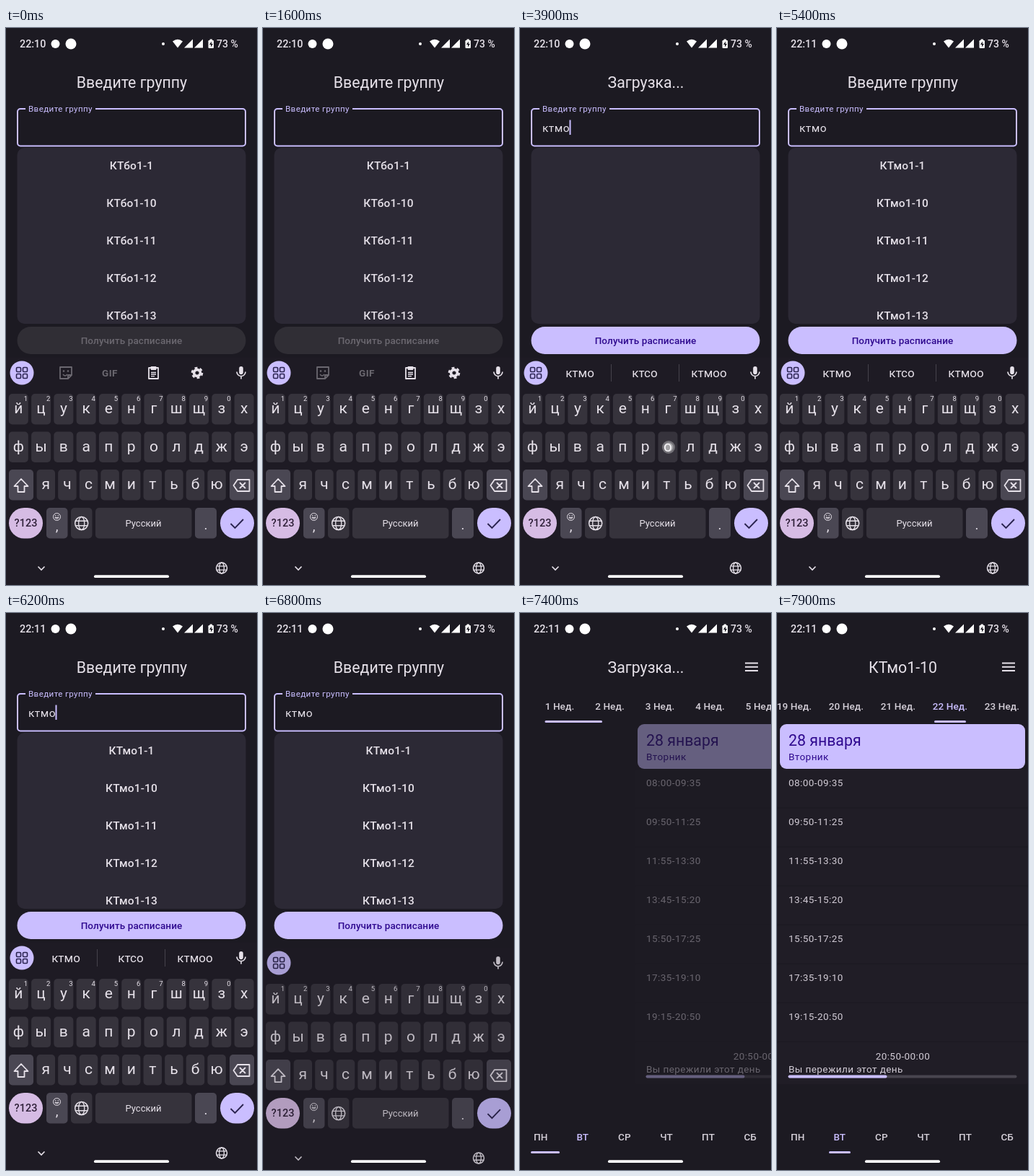
An HTML page that plays this animation: 348 px wide and 772 px high, repeating every 8000 ms.

```html
<!DOCTYPE html>
<html lang="ru">
<head>
<meta charset="utf-8">
<title>Расписание</title>
<style>
  html, body { margin: 0; width: 100%; height: 100%; overflow: hidden; background: #1c1a22; }
  svg { display: block; width: 100vw; height: 100vh; font-family: Roboto, "Noto Sans", sans-serif; }
  text { white-space: pre; }
</style>
</head>
<body>
<svg id="stage" viewBox="0 0 348 772"></svg>
<script>
const LOOP = 8000, STEP = 100;
const BG = '#1c1a22', INK = '#e6e1e9', ACCENT = '#cabeff', DEEP = '#2f0a8f',
      KEY = '#36333c', KEY_ALT = '#4a4753', DIM = '#6b6870';

// ---- drawing helpers ----
const rect = (x, y, w, h, r, fill, more = '') =>
  `<rect x="${x}" y="${y}" width="${w}" height="${h}" rx="${r}" fill="${fill}" ${more}/>`;
const circle = (x, y, r, fill, more = '') => `<circle cx="${x}" cy="${y}" r="${r}" fill="${fill}" ${more}/>`;
const line = (d, color = INK, width = 1.6, more = '') =>
  `<path d="${d}" fill="none" stroke="${color}" stroke-width="${width}" ${more}/>`;
const shape = (d, fill = INK) => `<path d="${d}" fill="${fill}"/>`;
const label = (s, x, y, size, { fill = INK, anchor = 'middle', weight = 400, gap = 0, id = '' } = {}) =>
  `<text ${id && `id="${id}"`} x="${x}" y="${y}" font-size="${size}" fill="${fill}" text-anchor="${anchor}" font-weight="${weight}" letter-spacing="${gap}">${s}</text>`;
const group = (id, body, more = '') => `<g id="${id}" ${more}>${body}</g>`;
const at = (x, y, body) => `<g transform="translate(${x} ${y})">${body}</g>`;
const globe = (x, y, r) => at(x, y,
  circle(0, 0, r, 'none', `stroke="${INK}" stroke-width="1.5"`) +
  `<ellipse rx="${r * .45}" ry="${r}" fill="none" stroke="${INK}" stroke-width="1.3"/>` +
  line(`M${-r * .9} ${-r * .36}H${r * .9}M${-r * .9} ${r * .36}H${r * .9}`, INK, 1.3));

// ---- status bar ----
const statusBar = () =>
  label('22:10', 19, 27, 14.3, { anchor: 'start', weight: 500, id: 'clock' }) +
  circle(68.5, 22, 6, '#fff') + circle(90, 22, 7.5, '#fff') + circle(218, 22, 2, '#fff') +
  shape('M231 18.5Q238 13 245 18.5L238 27.5Z', '#fff') +
  [247, 261].map(x => shape(`M${x} 27.5H${x + 12}V15.5Z`, '#fff')).join('') +
  rect(280.5, 17, 7.5, 11, 1.3, '#fff') + rect(282.5, 15.6, 3.5, 2, .5, '#fff') +
  shape('M285 18.5L282 23H284V26.5L287 22H285Z', BG) +
  label('73 %', 292, 27, 14, { anchor: 'start', weight: 500 });

// ---- search screen ----
const items = prefix => ['1-1', '1-10', '1-11', '1-12', '1-13']
  .map((s, i) => label(prefix + s, 174, 196 + 52 * i, 15.5, { weight: 500, gap: .15 })).join('');

const searchScreen = () =>
  rect(16, 112, 316, 51.5, 4, 'none', `stroke="${ACCENT}" stroke-width="2"`) +
  rect(27, 109, 97, 6, 0, BG) +
  label('Введите группу', 31, 116, 11.6, { fill: ACCENT, anchor: 'start', gap: .39 }) +
  label('', 31, 144, 15.5, { anchor: 'start', gap: .48, id: 'input' }) +
  rect(0, 127.5, 2, 20.5, 0, ACCENT, 'id="caret"') +
  rect(15.5, 166, 317, 244, 10, '#2c2935') +
  `<g clip-path="url(#listClip)">${group('listA', items('КТбо'))}${group('listB', items('КТмо'))}</g>` +
  rect(15.5, 414, 317, 38, 19, '#302e35', 'id="button"') +
  label('Получить расписание', 174, 438, 13.5, { weight: 500, gap: .1, id: 'buttonText' });

// ---- keyboard ----
const key = (x, y, w, fill = KEY, r = 5) => rect(x, y, w, 42.5, r, fill);
const letters = (row, x0, pitch, w, y) => [...row].map((c, i) => {
  const x = x0 + pitch * i;
  return key(x - w / 2, y, w) + label(c, x, y + 27, 21);
}).join('');

const tools = () =>
  at(83, 478, line('M-8 -8H8V3L3 8H-8ZM3 8V3H8', DIM, 1.8, 'stroke-linejoin="round"') +
    line('M-4 2Q-1 6 2 2', DIM, 1.5) + circle(-3, -2.5, 1.3, DIM) + circle(3, -2.5, 1.3, DIM)) +
  label('GIF', 144, 483, 13.5, { fill: DIM, weight: 700, gap: .5 }) +
  at(204.5, 478, line('M-6.5 -7H6.5V8H-6.5Z', INK, 1.8, 'stroke-linejoin="round"') +
    rect(-4, -9, 8, 5, 1, INK) + line('M-3.5 -.5H3.5M-3.5 2H3.5M-3.5 4.7H1.5', INK, 1.3)) +
  at(265, 478, circle(0, 0, 4.4, 'none', `stroke="${INK}" stroke-width="3.6"`) +
    circle(0, 0, 7, 'none', `stroke="${INK}" stroke-width="2.6" stroke-dasharray="3.9 3.43"`));

const suggestions = () =>
  [83, 173, 262].map((x, i) => label('', x, 484, 17, { id: 'hint' + i })).join('') +
  line('M126.5 466V490M220.5 466V490', '#45424c', 1);

const keyboard = () =>
  rect(0, 457, 348, 330, 0, '#1e1b24') +
  circle(22, 478, 16.5, ACCENT) +
  [[-7.5, -7.5], [1.5, -7.5], [-7.5, 1.5], [1.5, 1.5]].map(([x, y]) =>
    rect(22 + x, 478 + y, 6, 6, 1.3, 'none', 'stroke="#2b2450" stroke-width="1.6"')).join('') +
  group('tools', tools()) + group('hints', suggestions()) +
  at(326, 478, rect(-2.8, -9, 5.6, 11, 2.8, INK) + line('M-6 -1.5A6 6 0 0 0 6 -1.5M0 4.5V8.5', INK, 1.7)) +
  letters('йцукенгшщзх', 17.3, 31.28, 27, 507) +
  [...'1234567890'].map((c, i) => label(c, 27.3 + 31.28 * i, 517, 9.5)).join('') +
  letters('фывапролджэ', 17.3, 31.28, 27, 559.5) +
  letters('ячсмитьбю', 55.3, 29.6, 25.5, 612) +
  key(4, 612, 34, KEY_ALT) + key(310, 612, 34, KEY_ALT) +
  line('M21 625L11.5 635H16.5V643H25.5V635H30.5Z', INK, 1.8, 'stroke-linejoin="round"') +
  line('M321 626H337.5V642H321L315.5 634ZM324 630L332 638M332 630L324 638', INK, 1.8, 'stroke-linejoin="round"') +
  key(4, 665, 47, '#d6bce4', 21.2) + label('?123', 27.5, 691, 14.5, { fill: '#30213a', weight: 500 }) +
  key(56, 665, 29.5, KEY_ALT) + key(90, 665, 29.5) + key(124, 665, 133.5) + key(262, 665, 30, KEY_ALT) +
  at(70.5, 677.5, circle(0, 0, 5, 'none', `stroke="${INK}"`) + line('M-2.6 1Q0 4.5 2.6 1Z', INK, 1) +
    circle(-1.8, -1.5, .8, INK) + circle(1.8, -1.5, .8, INK)) +
  label(',', 70.5, 697, 19) + globe(104.7, 686.5, 9) +
  label('Русский', 190.5, 691, 13) + label('.', 277, 695, 19) +
  key(297, 665, 47, ACCENT, 21.2) + line('M311.5 687L317.5 693L329 681', '#2b2450', 1.9) +
  line('M44.5 746.5L49 751L53.5 746.5') + globe(299, 748.5, 7.5);

// ---- schedule screen ----
const HOURS = ['08:00-09:35', '09:50-11:25', '11:55-13:30', '13:45-15:20', '15:50-17:25', '17:35-19:10', '19:15-20:50'];
const body = { fill: '#d2ccd6', anchor: 'start', gap: .43 };
const tabX = n => n < 10 ? 55 + 69.5 * (n - 1) : 681.8 + 72 * (n - 10);
const WEEK = 22, SCROLL = tabX(WEEK) - 240;

const dayPage = () =>
  HOURS.map((s, i) => rect(0, 217 + 54 * i, 348, 52.5, 3, '#201d26') + label(s, 16, 240 + 54 * i, 13.5, body)).join('') +
  rect(0, 595, 348, 58, 3, '#201d26') +
  rect(4, 154, 340, 62, 9, ACCENT) +
  label('28 января', 16, 184, 21.3, { fill: DEEP, anchor: 'start' }) +
  label('Вторник', 16, 204, 13.5, { fill: DEEP, anchor: 'start', gap: .43 }) +
  label('20:50-00:00', 174.5, 618.5, 13.5, { ...body, anchor: 'middle' }) +
  label('Вы пережили этот день', 16, 637, 13.5, body) +
  rect(15.5, 640.5, 317, 4, 2, '#48454f') + rect(15.5, 640.5, 137, 4, 2, ACCENT);

const schedule = () =>
  group('page', dayPage()) +
  group('tabs', Array.from({ length: 24 }, (_, i) => label(`${i + 1} Нед.`, tabX(i + 1), 134, 13.5,
    { weight: 500, gap: .1, fill: i + 1 === WEEK ? ACCENT : '#d5d0d9' })).join('') +
    rect(0, 149, 0, 3, 1.5, ACCENT, 'id="weekBar"')) +
  ['ПН', 'ВТ', 'СР', 'ЧТ', 'ПТ', 'СБ'].map((d, i) => label(d, 28.7 + 58.1 * i, 731, 13.5,
    { weight: 500, gap: .1, fill: i === 1 ? ACCENT : '#d5d0d9' })).join('') +
  rect(0, 746, 0, 3, 1.5, ACCENT, 'id="dayBar"');

// ---- timeline ----
const TITLES = [
  ['Введите группу', -1000, 2600], ['Загрузка...', 2600, 4300], ['Введите группу', 4300, 6800],
  ['Загрузка...', 6800, 7600], ['КТмо1-10', 7600, 9000]
];
const TYPED = [2600, 3100, 3400, 3800];
const CARET_X = [31, 39, 47.2, 58.2, 68.5];
const HINTS = [[], ['к', 'как', 'кто'], ['кт', 'кто', 'кто-то'], ['ктм', 'ктс', 'ктмо'], ['ктмо', 'ктсо', 'ктмоо']];
const CARET_ON = [[100, 600], [1100, 1600], [2100, 4400], [4900, 5400], [5900, 6400]];
const TAPS = [[2600, 114, 523], [3100, 203, 634], [3400, 145, 634], [3800, 206, 581], [6400, 176, 243]];

const stage = document.getElementById('stage');
stage.innerHTML =
  `<defs><clipPath id="listClip">${rect(15.5, 166, 317, 244, 10, '#000')}</clipPath></defs>` +
  rect(0, 0, 348, 772, 0, BG) +
  group('search', searchScreen()) + group('schedule', schedule()) +
  TITLES.map(([s], i) => label(s, 174.5, 83, 21.3, { id: 'title' + i })).join('') +
  group('menu', line('M312 69.5H330M312 74.8H330M312 80H330', INK, 1.9)) +
  group('keyboard', keyboard()) +
  group('tap', circle(0, 0, 9, '#fff', 'opacity=".3"') + circle(0, 0, 6.5, '#fff', 'opacity=".35"')) +
  statusBar() + rect(122, 758.3, 104, 3.8, 1.9, '#fff');

const el = {};
stage.querySelectorAll('[id]').forEach(node => el[node.id] = node);
const set = (id, attrs) => { for (const k in attrs) el[id].setAttribute(k, attrs[k]); };
const show = (id, opacity) => set(id, { opacity: +opacity });
const write = (id, s) => { if (el[id].textContent !== s) el[id].textContent = s; };
const ramp = (t, a, b) => Math.min(1, Math.max(0, (t - a) / (b - a)));
const mix = (a, b, p) => a + (b - a) * p;
const smooth = p => p * p * (3 - 2 * p);
const easeOut = p => 1 - (1 - p) ** 3;
const bar = (id, left, right) => set(id, { x: left, width: right - left });

function render(t) {
  write('clock', t < 4400 ? '22:10' : '22:11');
  TITLES.forEach(([, from, to], i) => {
    const enter = ramp(t, from, from + 200), leave = ramp(t, to, to + 200);
    set('title' + i, {
      opacity: enter ** 1.7 * (1 - leave ** 1.4),
      transform: `translate(0 ${leave * 4 - (1 - enter) * 8})`
    });
  });

  const typed = TYPED.filter(at => t >= at).length;
  write('input', 'ктмо'.slice(0, typed));
  set('caret', { x: CARET_X[typed] });
  show('caret', CARET_ON.some(([a, b]) => t >= a && t < b));
  set('button', { fill: typed ? ACCENT : '#302e35' });
  set('buttonText', { fill: typed ? DEEP : DIM });
  show('listA', 1 - ramp(t, 2700, 2800));
  show('listB', ramp(t, 4300, 4500));
  show('search', 1 - ramp(t, 6800, 7000));

  HINTS[typed].forEach((s, i) => write('hint' + i, s));
  show('tools', !typed);
  show('hints', typed && t < 6700);
  const closing = ramp(t, 6700, 7000);
  show('keyboard', t < 6700 ? 1 : 1 - closing ** 1.5);
  set('keyboard', { transform: `translate(0 ${closing ** 3.5 * 330})` });

  const tap = TAPS.find(([start]) => t >= start && t < start + 200);
  show('tap', !!tap);
  if (tap) set('tap', { transform: `translate(${tap[1]} ${tap[2]})` });

  show('menu', t >= 7000);
  show('schedule', t >= 7400);
  const slide = easeOut(ramp(t, 7400, 7700)), scroll = ramp(t, 7400, 7900);
  show('page', mix(.42, 1, ramp(t, 7400, 7600)));
  set('page', { transform: `translate(${159 * (1 - slide)} 0)` });
  set('tabs', { transform: `translate(${-SCROLL * smooth(scroll)} 0)` });
  bar('weekBar', mix(34.5, SCROLL + 218, smooth(scroll)), mix(114, SCROLL + 262, smooth(scroll)));
  bar('dayBar', mix(15, 72, slide), mix(55, 102, slide));
}

const start = performance.now();
function tick() {
  const t = (performance.now() - start) % LOOP;
  render(Math.floor(t / STEP) * STEP);
  requestAnimationFrame(tick);
}
tick();
</script>
</body>
</html>
```
